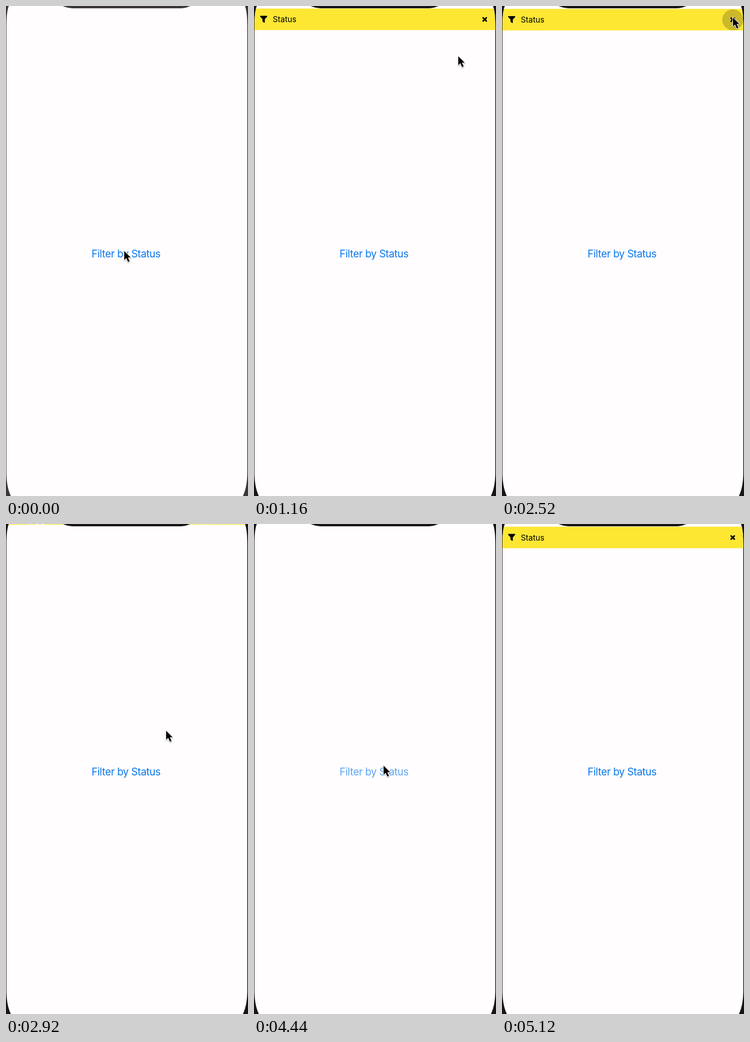
An HTML page for the animation above (5160 ms loop, 526 by 1064 pixels).

```html
<!DOCTYPE html>
<html lang="en">
<head>
<meta charset="utf-8">
<title>Filter by Status</title>
<style>
  html, body { margin: 0; width: 100%; height: 100%; overflow: hidden; background: #191417; }
  svg { display: block; width: 100%; height: 100%; }
  text { font-family: Inter, Roboto, "Open Sans", sans-serif; }
</style>
</head>
<body>
<svg viewBox="0 0 526 1064" preserveAspectRatio="none">
  <defs>
    <clipPath id="screen">
      <path d="M1 46C1 26 2 11 6 0H123C131 3 138 5 150 5H376C388 5 393 3 401 0H519.5C523.5 11 524.5 26 524.5 46V1012C524.5 1034 521.5 1050 515 1064H10.500C4 1050 1 1034 1 1012Z"/>
    </clipPath>
    <filter id="shadow" x="-50%" y="-50%" width="200%" height="200%">
      <feDropShadow dx="0" dy="1.300" stdDeviation="1.200" flood-opacity=".4"/>
    </filter>
  </defs>
  <rect id="bezel" width="526" height="1064"/>
  <g clip-path="url(#screen)">
    <rect width="526" height="1064" fill="#fffdfe"/>
    <text id="label" x="186" y="545.6" font-size="22.2" letter-spacing="-.44" fill="#0b78ec">Filter by Status</text>
    <g id="bar">
      <rect y="6.300" width="526" height="46.700" fill="#fde733"/>
      <path d="M14 22H28Q29.600 22.600 28.600 24L23.500 29.300V36Q23 37.400 21.800 36.800L19 34.700Q18.500 34.300 18.500 33.600V29.300L13.400 24Q12.400 22.600 14 22Z"/>
      <text x="40.700" y="36.200" font-size="17.300">Status</text>
      <path d="M498 26.300L505 33.300M505 26.300L498 33.300" stroke="#000" stroke-width="3.300" stroke-linecap="round"/>
      <circle id="touch" cx="501.500" cy="30" r="22.700"/>
    </g>
    <g fill="#fff">
      <text x="48" y="2.400" font-size="19" font-weight="600">1:33</text>
      <path d="M415 1V-3H419V1ZM421 1V-6H425V1ZM427 1V-9H431V1ZM433 1V-12H437V1Z" opacity=".5"/>
      <path d="M449 -2.500Q453 -6 457 -2.500L453 1.500Z"/>
      <rect x="470" y="-12" width="30" height="14.500" rx="4" fill="none" stroke="#fff" opacity=".6"/>
    </g>
  </g>
  <g id="cursor">
    <path d="M0 0V19.500L4.500 15.300L8.300 23.700L11.800 22.200L8.100 13.900H14Z" stroke="#fff" stroke-width="2.200" stroke-linejoin="round" paint-order="stroke" filter="url(#shadow)"/>
  </g>
</svg>
<script>
const LOOP = 5160;
const $ = id => document.getElementById(id);
const [bezel, label, bar, touch, cursor] = ['bezel', 'label', 'bar', 'touch', 'cursor'].map($);

// [time, x, y] of the pointer tip
const path = [
  [0, 257, 532], [850, 257, 532], [1160, 444, 109], [1480, 495, 40], [1800, 502, 25],
  [2640, 502, 25], [3100, 270, 664], [3340, 184, 618], [3640, 246, 538], [3760, 246, 538],
  [3920, 251, 546], [4100, 254, 538], [4380, 254, 538], [4700, 545, 400], [LOOP, 545, 400]
];

const clamp = x => Math.max(0, Math.min(1, x));
const ramp = (t, start, length) => clamp((t - start) / length);
const smooth = x => x * x * (3 - 2 * x);

// critically damped spring from 0 to 1
function spring(t, start, speed) {
  const x = Math.max(0, t - start) / 1000 * speed;
  return 1 - Math.exp(-x) * (1 + x);
}

const press = (t, down, up) =>
  smooth(ramp(t, down, 130)) * (1 - smooth(ramp(t, up, 220)));

function pointer(t) {
  const i = path.findIndex(p => p[0] > t);
  const [a, b] = [path[i - 1], path[i]];
  const k = smooth(ramp(t, a[0], b[0] - a[0]));
  return [1, 2].map(n => a[n] + (b[n] - a[n]) * k);
}

function barShown(t) {
  if (t < 2600) return spring(t, 585, 11);
  if (t < 4000) return 1 - spring(t, 2600, 16);
  return spring(t, 4481, 11);
}

function draw(t) {
  const fade = ramp(t, 0, 160);
  const shade = [[59, 25], [54, 20], [56, 23]].map(([a, b]) => Math.round(a + (b - a) * fade));
  bezel.setAttribute('fill', `rgb(${shade})`);
  bar.setAttribute('transform', `translate(0 ${(barShown(t) - 1) * 53.5})`);
  label.setAttribute('opacity', 1 - 0.8 * Math.max(press(t, 320, 440), press(t, 4110, 4320)));
  touch.setAttribute('opacity', 0.2 * press(t, 2360, 2580));
  cursor.setAttribute('transform', `translate(${pointer(t)})`);
}

const begin = performance.now();
function tick() {
  draw((performance.now() - begin) % LOOP);
  requestAnimationFrame(tick);
}
tick();
</script>
</body>
</html>
```
